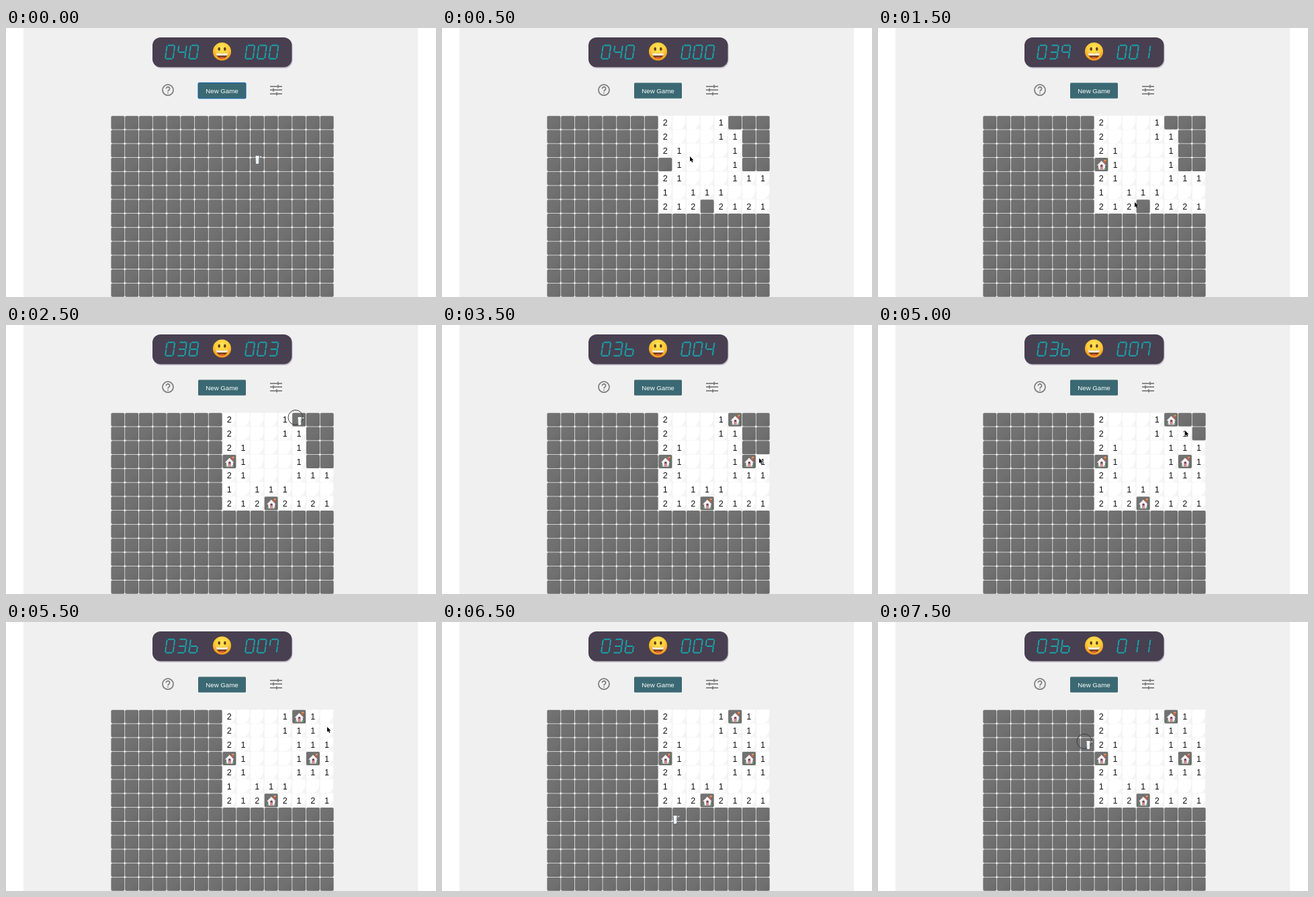
These frames come from a looping animation (640 px wide and 400 px high, 8000 ms). An HTML page:

```html
<!DOCTYPE html>
<html lang="en">
<head>
<meta charset="utf-8">
<title>Minefield</title>
<style>
  html, body { margin: 0; width: 100%; height: 100%; overflow: hidden; background: #fff; }
  svg { display: block; width: 640px; height: 400px; }
  text { font-family: "Liberation Sans", Arial, sans-serif; text-anchor: middle; }
  .num { font-size: 12.6px; fill: #111; }
  .lcd { fill: none; stroke: #16a3ab; stroke-width: 2; stroke-linecap: butt; }
  .icon { fill: none; stroke: #7b7b7b; stroke-width: 1.7; }
</style>
</head>
<body>
<svg id="stage" viewBox="0 0 640 400" xmlns="http://www.w3.org/2000/svg">
  <defs>
    <linearGradient id="tile" x1="0" y1="0" x2="1" y2="1">
      <stop offset="0" stop-color="#737373"/>
      <stop offset=".55" stop-color="#707070"/>
      <stop offset="1" stop-color="#696969"/>
    </linearGradient>
    <radialGradient id="face" cx=".5" cy=".32" r=".7">
      <stop offset="0" stop-color="#ffe75e"/>
      <stop offset=".55" stop-color="#ffcb36"/>
      <stop offset="1" stop-color="#ee8a1c"/>
    </radialGradient>
    <clipPath id="mouth"><path d="M-8.6 2.2Q0 4.4 8.6 2.2C8.2 7.4 4.6 10.4 0 10.4S-8.2 7.4-8.6 2.2Z"/></clipPath>

    <g id="open">
      <rect x=".3" y=".3" width="20.2" height="20.2" rx="1.5" fill="#fff"/>
      <path d="M20.3 9.5C18.6 14 16 17.6 12.6 20.3H20.3Z" fill="#f5f5f5"/>
      <path d="M20.4 1V20" stroke="#ededed" stroke-width=".7"/>
    </g>
    <g id="cover">
      <rect x=".4" y=".4" width="20" height="20" rx="1.9" fill="url(#tile)"/>
    </g>
    <g id="house">
      <path d="M6 11.5H16V18H6Z" fill="#fafafa"/>
      <path d="M3.8 12 10.6 5 17.4 12Z" fill="#f7f3f3"/>
      <path d="M13.6 4.6H16.2V9.6L13.6 7Z" fill="#e2574c"/>
      <path d="M14.6 3.4h3v1.8h-3Z" fill="#f2a23c"/>
      <path d="M8.6 18V12.6A2.2 2.2 0 0 1 13 12.6V18Z" fill="#d58b9c"/>
      <circle cx="10.8" cy="12.2" r="1.5" fill="#584a55"/>
      <path d="M4.4 15.4H6.8V18H4.4ZM14.6 15.6H17V18H14.6Z" fill="#62ac70"/>
    </g>
    <g id="hand">
      <path d="M-2.3-6H2.4L2.2 4.4 1.2 6H-1.4L-2.2 4.2Z" fill="#f4f8fc"/>
      <path d="M-2.3-6H2.4V-4.6H-2.3Z" fill="#fff"/>
      <path d="M-1.5 0V5M1.4-3V3" stroke="#cfdfea" stroke-width=".8"/>
      <path d="M2.6-2.2 4.6-5" stroke="#a9b7c2" stroke-width=".8"/>
      <path d="M4.6-5.6h1.5v1.5H4.6Z" fill="#fff"/>
      <path d="M-4.6 4.6-2.8 2.8" stroke="#555" stroke-width="1"/>
    </g>
    <path id="arrow" d="M0 0V7.6L1.8 6 3.1 8.9 4.4 8.3 3.2 5.6H5.5Z" fill="#000" stroke="#fff" stroke-width=".7" paint-order="stroke"/>
  </defs>

  <rect x="26" width="587" height="400" fill="#f0f0f0"/>

  <rect x="219" y="15.5" width="207.5" height="44.5" rx="12" fill="#c5c0c9"/>
  <rect x="218" y="14" width="207.5" height="44.3" rx="12" fill="#483f50"/>
  <g id="mines"></g>
  <g id="clock"></g>

  <g transform="translate(321.5 35)">
    <circle r="13.6" fill="url(#face)"/>
    <ellipse cx="-4.3" cy="-3.8" rx="1.8" ry="2.8" fill="#67401a"/>
    <ellipse cx="4.3" cy="-3.8" rx="1.8" ry="2.8" fill="#67401a"/>
    <g clip-path="url(#mouth)">
      <rect x="-10" width="20" height="12" fill="#7a4318"/>
      <rect x="-10" width="20" height="5.8" fill="#fff"/>
      <ellipse cy="10.6" rx="4.6" ry="2.6" fill="#dc5a41"/>
    </g>
  </g>

  <circle class="icon" cx="241" cy="92.2" r="8"/>
  <path class="icon" d="M238.4 90.4A2.6 2.6 0 1 1 242.6 92.3Q241 93.2 241 94.6M241 95.9V97.6"/>
  <path class="icon" d="M393 86.8H411M393 92.2H411M393 97.8H411M405 84.4V89.2M398 89.8V94.6M403 95.4V100.2"/>

  <rect id="button" x="286" y="81.4" width="71" height="23.4" rx="1.5" fill="#3b6973"/>
  <text x="321.5" y="96.6" font-size="9.7" fill="#fff">New Game</text>

  <g id="board"></g>
  <circle id="ring" r="11" fill="none" stroke="#3c3c3c" stroke-width="1"/>
  <use id="pointer"/>
</svg>
<script>
const STEP = 500, STEPS = 16;
const COLS = 16, ROWS = 13, SIZE = 20.75, LEFT = 156, TOP = 130.3, FIRST = 8;

// Right half of the field: digits, "." for empty, F for a marked mine.
const field = [
  "2...1F1.",
  "2...111.",
  "21...111",
  "F1...1F1",
  "21...111",
  "1.111...",
  "212F2121"
];
// Steps at which cells get marked or opened; all others open at step 1.
const marked = { "8,3": 3, "11,6": 4, "13,0": 6, "14,3": 7 };
const opened = { "15,3": 7, "14,2": 8, "15,2": 9, "14,1": 10, "14,0": 11, "15,0": 11, "15,1": 11 };

const seconds = [0, 0, 1, 1, 2, 3, 4, 4, 5, 6, 7, 7, 8, 9, 10, 11];
const pointers = [
  "hand 374 196", "arrow 369 191", "hand 333 204 ring", "arrow 382 259",
  "hand 394 266", "hand 437 143 ring", "hand 458 204 ring", "arrow 472 198",
  "arrow 457 178", "hand 457.5 161", "arrow 457 157", "arrow 478 156",
  "arrow 440 257", "hand 347 294", "hand 312 226", "hand 313 183 ring"
].map(p => p.split(" "));

const segments = {
  a: "M1.2 0H10.8", b: "M11.5 .8V9.4", c: "M11.5 10.8V19.2", d: "M.8 20H10.6",
  e: "M0 10.8V19.2", f: "M0 .8V9.4", g: "M1.2 10.1H10.4"
};
const glyphs = ["abcdef", "bc", "abdeg", "abcdg", "bcfg", "acdfg", "cdefg", "abcf", "abcdefg", "abcfg"];

const $ = id => document.getElementById(id);

function add(parent, tag, attrs) {
  const el = document.createElementNS("http://www.w3.org/2000/svg", tag);
  for (const k in attrs) el.setAttribute(k, attrs[k]);
  return parent.appendChild(el);
}

function makeCounter(id, left) {
  const digits = [0, 1, 2].map(i => add($(id), "path", {
    class: "lcd", transform: `translate(${left + i * 17.6} 25.8) skewX(-8)`
  }));
  return value => String(value).padStart(3, "0").split("").forEach((n, i) =>
    digits[i].setAttribute("d", [...glyphs[n]].map(s => segments[s]).join("")));
}

const showMines = makeCounter("mines", 239.8);
const showClock = makeCounter("clock", 358.8);

const timed = []; // parts visible while from <= step < to
for (let r = 0; r < ROWS; r++) {
  for (let c = 0; c < COLS; c++) {
    const x = LEFT + c * SIZE, y = TOP + r * SIZE, key = c + "," + r;
    const cell = add($("board"), "g", { transform: `translate(${x} ${y})` });
    const mark = field[r] && field[r][c - FIRST];
    if (mark && mark !== "F") {
      const at = opened[key] || 1;
      const front = add(cell, "g", {});
      add(front, "use", { href: "#open" });
      if (mark !== ".") add(front, "text", { class: "num", x: 10.3, y: 15.2 }).textContent = mark;
      timed.push({ el: front, from: at, to: STEPS });
      timed.push({ el: add(cell, "use", { href: "#cover" }), from: 0, to: at });
    } else {
      add(cell, "use", { href: "#cover" });
      if (mark) timed.push({ el: add(cell, "use", { href: "#house" }), from: marked[key], to: STEPS });
    }
  }
}

function show(el, on) { el.setAttribute("visibility", on ? "visible" : "hidden"); }

function draw(step) {
  for (const { el, from, to } of timed) show(el, step >= from && step < to);
  showMines(40 - Object.values(marked).filter(at => at <= step).length);
  showClock(seconds[step]);
  $("button").setAttribute("stroke", step ? "none" : "#0d5fb4");

  const [kind, x, y, ring] = pointers[step];
  $("pointer").setAttribute("href", "#" + kind);
  $("pointer").setAttribute("transform", `translate(${x} ${y})`);
  $("ring").setAttribute("transform", `translate(${x - 6} ${y - 5.5})`);
  show($("ring"), ring);
}

let last = -1;
const start = performance.now();
function tick() {
  const step = Math.floor((performance.now() - start) / STEP) % STEPS;
  if (step !== last) draw(last = step);
  requestAnimationFrame(tick);
}
tick();
</script>
</body>
</html>
```
